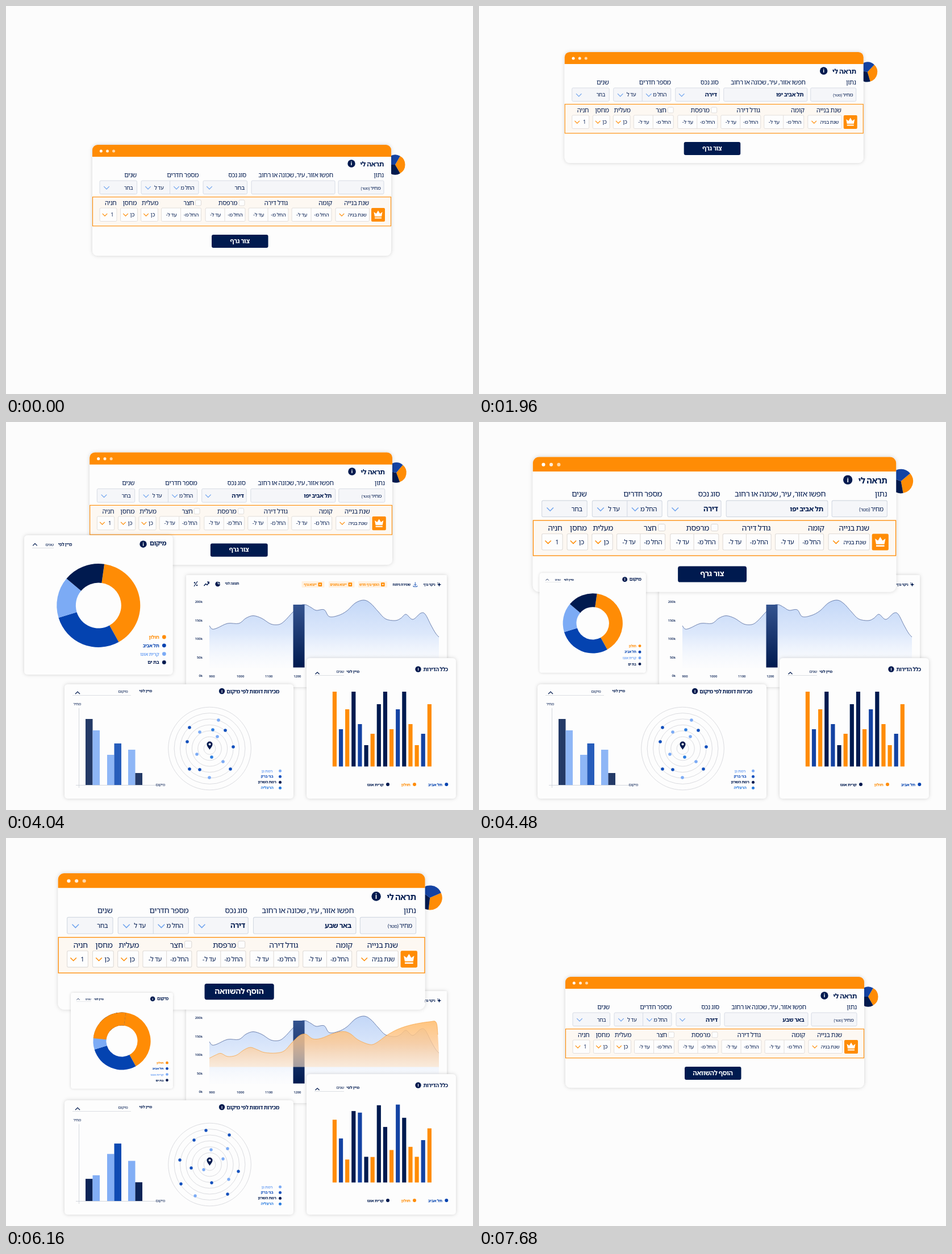
Animation, 822 px wide and 682 px high, one loop 7880 ms. Source, as an HTML page:

```html
<!DOCTYPE html>
<html lang="he">
<head>
<meta charset="utf-8">
<title>Property charts</title>
<style>
html, body { margin: 0; width: 100%; height: 100%; overflow: hidden; background: #fcfcfc; }
svg { display: block; width: 822px; height: 682px; }
text {
  font-family: "Open Sans", "Noto Sans Hebrew", "Liberation Sans", sans-serif;
  direction: rtl; white-space: pre; letter-spacing: -.025em; word-spacing: -.05em;
}
text.ltr { direction: ltr; letter-spacing: 0; }
</style>
</head>
<body>
<svg id="stage" viewBox="0 0 822 682"></svg>
<script>
const LOOP = 7880;
const NAVY = '#001a4f', BLUE = '#0443b0', MID = '#2b7de0', LIGHT = '#7cabf5', ORANGE = '#ff8c05';
const $ = id => document.getElementById(id);

// drawing helpers; Hebrew text takes its right edge as x
const text = (x, y, s, size, fill = NAVY, weight = 400, more = '') =>
  `<text x="${x}" y="${y}" font-size="${size}" fill="${fill}" font-weight="${weight}" ${more}>${s}</text>`;
const mid = 'text-anchor="middle"';
const rect = (x, y, w, h, fill, more = '') =>
  `<rect x="${x}" y="${y}" width="${w}" height="${h}" fill="${fill}" ${more}/>`;
const dot = (x, y, r, fill, more = '') => `<circle cx="${x}" cy="${y}" r="${r}" fill="${fill}" ${more}/>`;
const line = (d, stroke, w = 1, more = '') =>
  `<path d="${d}" fill="none" stroke="${stroke}" stroke-width="${w}" ${more}/>`;
const chevron = (x, y, w, stroke, dir = 1) =>
  line(`M${x - w / 2} ${y - dir * w / 4}l${w / 2} ${dir * w / 2}l${w / 2} ${-dir * w / 2}`, stroke, 1.2);
const info = (x, y, r) => dot(x, y, r, NAVY) +
  text(x, y + r * .5, 'i', r * 1.4, '#fff', 700, 'class="ltr" ' + mid);
const card = (x, y, w, h, r = 6) => rect(x, y, w, h, '#fdfdfd', `rx="${r}" filter="url(#shade)"`);
const polar = (cx, cy, r, deg) => {
  const a = (deg - 90) * Math.PI / 180;
  return `${(cx + r * Math.cos(a)).toFixed(2)} ${(cy + r * Math.sin(a)).toFixed(2)}`;
};
const wedge = (cx, cy, R, r, a, b) => {
  if (b - a < .1) return '';
  const big = b - a > 180 ? 1 : 0;
  return `M${polar(cx, cy, R, a)}A${R} ${R} 0 ${big} 1 ${polar(cx, cy, R, b)}` +
    `L${polar(cx, cy, r, b)}A${r} ${r} 0 ${big} 0 ${polar(cx, cy, r, a)}Z`;
};
const smooth = s => {
  const p = s.split(' ').map(q => q.split(',').map(Number));
  let d = 'M' + p[0];
  for (let i = 0; i < p.length - 1; i++) {
    const a = p[i - 1] || p[i], b = p[i], c = p[i + 1], e = p[i + 2] || c;
    const k = j => [b[j] + (c[j] - a[j]) / 6, c[j] - (e[j] - b[j]) / 6];
    const [x1, x2] = k(0), [y1, y2] = k(1);
    d += `C${x1} ${y1} ${x2} ${y2} ${c}`;
  }
  return d;
};

// search window
function field(x, y, w, fill, stroke, split) {
  return rect(x, y, w, 23.5, fill, `rx="2" stroke="${stroke}" stroke-width=".9"`) +
    (split ? line(`M${split} ${y}v23.5`, stroke, .9) : '');
}
function windowArt() {
  const cool = (x, w, split) => field(x, 307, w, '#f5f6f9', '#d3d9e2', split);
  const warm = (x, w, split) => field(x, 355, w, '#fdfdfd', '#e0dcd8', split);
  let s = '<g id="pie">' + [[30, ORANGE], [150, NAVY], [270, '#1443a3']].map(([a, c]) =>
    `<path d="${wedge(685, 279, 17.5, 0, a, a + 120)}" fill="${c}"/>`).join('') + '</g>';
  s += card(152, 244, 526, 195, 9) +
    `<path d="M152 265v-12a9 9 0 0 1 9-9h508a9 9 0 0 1 9 9v12z" fill="${ORANGE}"/>` +
    dot(167.3, 255, 2.5, '#fff') + dot(178.5, 255, 2.5, '#fff', 'opacity=".85"') +
    dot(189.5, 255, 2.5, '#fff', 'opacity=".65"') +
    text(665, 282, 'תראה לי', 11.9, NAVY, 700) + info(608, 277, 6.7);
  for (const [x, l] of [[665, 'נתון'], [576, 'חפשו אזור, עיר, שכונה או רחוב'], [423, 'סוג נכס'],
    [339, 'מספר חדרים'], [230, 'שנים']]) s += text(x, 301, l, 11.2);
  s += cool(585, 80) + cool(432, 147) + cool(347, 77.5) + cool(238, 101, 288.5) + cool(165, 65.5) +
    text(659.5, 322.5, 'מחיר', 9.1) + text(640, 322.5, '(מטר)', 6.8) +
    text(331.5, 322.5, 'החל מ', 9.4) + text(277.5, 322.5, 'עד ל', 9.4) + text(223.5, 322.5, 'בחר', 9.4) +
    text(572.5, 322.5, '', 10, NAVY, 700, 'id="city"') + text(420, 322.5, '', 10.6, NAVY, 400, 'id="kind"');
  for (const x of [358, 300, 250, 177]) s += chevron(x, 319.5, 9.5, '#6ea3ee');
  s += rect(152.5, 335.7, 525, 51, '#fdf8f2', `stroke="${ORANGE}" stroke-width="1.1"`);
  for (const [x, l] of [[639, 'שנת בנייה'], [574, 'קומה'], [496, 'גודל דירה'], [407, 'מרפסת'],
    [331, 'חצר'], [268, 'מעלית'], [230, 'מחסן'], [194.5, 'חניה']]) s += text(x, 350.3, l, 11.2);
  for (const x of [410, 333.5]) s += rect(x, 341, 10, 10, '#fdfdfd', 'rx="2" stroke="#d9d5d2" stroke-width=".8"');
  s += warm(580, 59.5) + text(634.5, 370, 'שנת בניה', 9) + chevron(591, 367, 8.5, ORANGE);
  for (const x of [503, 427, 351, 273.5])
    s += warm(x, 70, x + 34) + text(x + 65.5, 370, 'החל מ-', 9.2) + text(x + 27, 370, 'עד ל-', 9.2);
  for (const [x, l] of [[237.5, 'כן'], [201.5, 'כן'], [165, '1']])
    s += warm(x, 30) + text(x + 24.5, 370, l, 9.4) + chevron(x + 9, 367, 8.5, ORANGE);
  s += rect(643, 355, 24, 24, ORANGE, 'rx="2"') +
    '<path d="M649 370l-1.5-8 4.2 3 3.3-5.5 3.3 5.5 4.2-3-1.5 8zM649 371.5h12v2h-12z" fill="#fff"/>' +
    rect(362, 402, 99.5, 23, NAVY, 'rx="3"') + text(411.5, 416.7, '', 11.3, '#fff', 600, mid + ' id="action"');
  return s;
}

// area chart card
const curveA = smooth('358,358 363,364 372,362 390,354 410,354 422,345 435,340.5 450,345 466,355 480,356 490,350 505,334 517,323 527,321 537,326 546,331 560,330 569,342 585,340 600,332 615,318 630,313 642,319 655,333 668,346 685,349 695,345 704,338 716,347 730,336 738,338 748,357 756,371 762,378');
const curveB = smooth('358,387 368,382 378,378.5 390,384 405,382 418,373 430,368 442,372 455,377 475,378 490,374 503,360 517,347 528,345 540,353 555,352 575,344 593,340 606,344 620,355 640,363 652,360 670,347 690,336 715,328 745,323 757,324 760,345 762,378');
function areaArt() {
  const chip = (x, w, l) => rect(x, 280, w, 11, '#fff1e0', 'rx="1"') +
    text(x + w - 14, 287.8, l, 5.8, ORANGE, 700) +
    rect(x + w - 11, 282.3, 6.6, 6.6, ORANGE, 'rx="1"') + rect(x + w - 9, 284.6, 2.6, 2, '#fff1e0');
  let s = card(317, 269, 459, 197, 3) +
    line('M331 289l6-9', NAVY, 1.2) + dot(332, 282.5, 1.2, NAVY) + dot(336, 287, 1.2, NAVY) +
    line('M348.5 288l3-3.5 2.5 2 3-4.5M354 281.2h3.2v3.2', NAVY, 1.4) +
    dot(372.7, 284.8, 4.4, NAVY) + line('M373.2 280v4.5h4.5', '#fdfdfd', 1) +
    text(410, 285.5, 'תצוגה לפי', 5.8, NAVY, 600) +
    chip(520.5, 40, 'ייצוא גרף') + chip(568, 45.5, 'ייצוא נתונים') + chip(620, 51, 'הוסף גרף חדש') +
    text(712, 288, 'שמירת ניתוח', 5.8, NAVY, 600) +
    line('M720.3 281.5v6m-2.2-2.2l2.2 2.2 2.2-2.2M717 287.5v2h6.6v-2', BLUE, .9) +
    text(755.5, 288, 'ניקוי גרף', 5.8, NAVY, 600) +
    `<path d="M762.5 282l1 2.8 2.8 1-2.8 1-1 2.8-1-2.8-2.8-1 2.8-1z" fill="${NAVY}"/>` + dot(760, 283, .8, NAVY);
  [200, 150, 100, 50, 0].forEach((v, i) =>
    s += text(346, 318 + i * 32.5, v + 'k', 5.8, NAVY, 600, 'class="ltr" text-anchor="end"'));
  for (let i = 0; i < 9; i++)
    s += text(362.5 + i * 50.1, 449.4, 900 + i * 100, 5.8, NAVY, 600, 'class="ltr" ' + mid);
  const layer = (n, d, ink) => `<path d="${d}V432H358Z" fill="url(#fill${n})" clip-path="url(#clip${n})"/>` +
    line(d, ink, .8, `id="line${n}" pathLength="100" stroke-dasharray="100 200"`);
  return s + layer('A', curveA, '#51689c') + rect(505.5, 321, 20, 0, 'url(#columnFill)', 'id="column"') +
    layer('B', curveB, '#f6a649');
}

// ring chart card
const slices = [[8, 151, ORANGE], [151, 253, BLUE], [253, 310, LIGHT], [310, 368, NAVY]];
function ringArt() {
  let s = card(32, 199, 261.5, 245) + text(282, 217.5, 'מיקום', 11.2, NAVY, 700) + info(241.5, 214.7, 6.2) +
    text(116, 218.5, 'מיין לפי', 7.5, NAVY, 600) + text(84, 218.5, 'שנים', 7.5) +
    line('M46 221.5h38', '#d5d8de', .8) + chevron(51, 215.5, 7.5, NAVY, -1);
  slices.forEach((a, i) => s += `<path id="slice${i}" fill="${a[2]}"/>`);
  s += `<path id="cover" fill="${ORANGE}"/>`;
  ['חולון', 'תל אביב', 'קרית אונו', 'בת ים'].forEach((l, i) => {
    const c = slices[i][2], y = 378 + i * 14.8;
    s += dot(278.3, y, 3.4, c) + text(269.5, y + 3, l, 8.4, c, 600);
  });
  return s;
}

// similar sales card
const pairs = [[140, 522, 613, NAVY], [152.5, 542, 602, LIGHT], [178, 585, 550, LIGHT],
  [190.5, 565, 532, BLUE], [215, 576, 566, LIGHT], [227.5, 617, 603, NAVY]];
const before = '323,537 386,542 319,562 400,571 323,610 395,610 341,611 364,541 362,589 374,524 341,545 372,553 336,584 382,597 358,625';
const after = '352,514 393,522 331,531 306,566 326,580 409,586 308,608 362,606 390,626 361,548 390,546 382,564 348,583 392,600 333,629';
const spots = (s, name) => s.split(' ').map((p, i) =>
  dot(...p.split(','), 0, i > 8 ? LIGHT : name === 'old' && i > 6 ? MID : '#1250bd', `class="${name}"`)).join('');
function salesArt() {
  let s = card(103, 461, 403, 201) + text(481, 476.5, 'מכירות דומות לפי מיקום', 9.2, NAVY, 700) +
    info(380, 473, 5.2) + text(257, 474.5, 'מיין לפי', 7, NAVY, 600) + text(214.5, 475.5, 'מיקום', 7) +
    line('M117 480.5h103', '#d5d8de', .8) + chevron(126, 476, 8, NAVY, -1) +
    text(132, 498, 'מחיר', 6.8) + text(280, 639.5, 'מיקום', 6.8) +
    line('M128.5 503v140M123 638.5h141', '#cfd3da', .9);
  pairs.forEach((b, i) => s += rect(b[0], 638, 12.5, 0, b[3], `id="pair${i}"`));
  for (let i = 1; i < 8; i++) s += dot(358.5, 574, i * 10.4, 'none', 'stroke="#d2d4d9" stroke-width=".8"');
  s += spots(before, 'old') + spots(after, 'new') +
    `<path d="M358.5 576c-2-3.5-5-6-5-9.5a5 5 0 0 1 10 0c0 3.5-3 6-5 9.5z" fill="${NAVY}"/>` + dot(358.5, 566.5, 2, '#fff');
  [['רמת גן', LIGHT], ['בני ברק', '#1250bd'], ['רמת השרון', NAVY], ['הרצליה', MID]].forEach(([l, c], i) =>
    s += dot(482.5, 613.3 + i * 10, 2.5, c) + text(459.5, 615.5 + i * 9.9, l, 7, c, 600, mid));
  return s;
}

// all apartments card
const topsOld = [474, 540, 505, 474, 531, 568, 548, 496];
const topsNew = [499, 526, 576, 481, 474, 559, 563, 465, 514, 550, 462, 495, 545, 559, 528, 513];
function flatsArt() {
  const ink = { o: ORANGE, b: '#1443a3', d: NAVY };
  let s = card(529, 415, 263, 247) + text(778, 438, 'כלל הדירות', 9.2, NAVY, 700) + info(725.5, 434.5, 5.2) +
    text(622, 441, 'מיין לפי', 7, NAVY, 600) + text(595, 441, 'שנים', 7) +
    line('M543 445.5h52', '#d5d8de', .8) + chevron(548, 441.5, 7, NAVY, -1);
  [...'obodbdoddobdoobo'].forEach((c, i) => s += rect(574.8 + i * 11.13, 605.5, 7.2, 0, ink[c], `id="flat${i}"`));
  for (const [x, l, c] of [[775.3, 'תל אביב', BLUE], [719, 'חולון', ORANGE], [672, 'קרית אונו', NAVY]])
    s += dot(x, 637, 3, c) + text(x - 7.5, 639.5, l, 7.3, c, 600);
  return s;
}

const fade = (id, stops, y1, y2) =>
  `<linearGradient id="${id}" gradientUnits="userSpaceOnUse" x1="0" x2="0" y1="${y1}" y2="${y2}">` +
  stops.map(([o, c, a]) => `<stop offset="${o}" stop-color="${c}" stop-opacity="${a}"/>`).join('') + '</linearGradient>';
$('stage').innerHTML = '<defs>' +
  '<filter id="shade" x="-10%" y="-10%" width="120%" height="120%"><feDropShadow dx="0" dy="0" stdDeviation="3" flood-color="#000" flood-opacity=".17"/></filter>' +
  fade('fillA', [[0, '#c3d7f7', 1], [.5, '#dbe7fb', .95], [1, '#f8fafe', .3]], 313, 432) +
  fade('fillB', [[0, '#ffbe70', .88], [.35, '#fdc994', .8], [1, '#fff6ec', .5]], 323, 432) +
  fade('columnFill', [[0, '#34538f', 1], [1, NAVY, 1]], 321, 432) +
  ['A', 'B'].map(n => `<clipPath id="clip${n}"><rect id="wipe${n}" x="350" y="300" width="420" height="0"/></clipPath>`).join('') +
  '</defs>' + [['area', areaArt], ['window', windowArt], ['flats', flatsArt], ['sales', salesArt], ['ring', ringArt]]
    .map(([id, art]) => `<g id="${id}">${art()}</g>`).join('');

// timing helpers
const part = (t, a, b) => Math.min(1, Math.max(0, (t - a) / (b - a)));
const lerp = (a, b, p) => a + (b - a) * p;
const cubic = p => p < .5 ? 4 * p ** 3 : 1 - (2 - 2 * p) ** 3 / 2;
const quad = p => p < .5 ? 2 * p * p : 1 - (2 - 2 * p) ** 2 / 2;
const out = p => 1 - (1 - p) ** 3;
const back = p => 1 + 1.6 * (p - 1) ** 3 + .6 * (p - 1) ** 2;
const set = (id, k, v) => $(id).setAttribute(k, v);

const swing = [[0, 0], [760, 47], [1520, 0], [2680, 47], [4040, 10], [5240, 46], [6920, 30], [7680, 0], [LOOP, 0]];
function along(keys, t) {
  const i = keys.findIndex(k => k[0] > t), [a, x] = keys[i - 1], [b, y] = keys[i];
  return lerp(x, y, quad(part(t, a, b)));
}
function pop(id, t, a, b, cx, cy, base = '') {
  const p = part(t, a, b), q = part(t, 7250, 7480);
  const k = p ? lerp(.3, 1, back(p)) * (1 - .7 * q * q) : 0;
  set(id, 'transform', `${base} translate(${cx} ${cy}) scale(${k}) translate(${-cx} ${-cy})`);
  set(id, 'opacity', Math.min(1, p * 3) * (1 - q));
}
function bar(id, base, top) {
  set(id, 'y', top);
  set(id, 'height', base - top);
}
function cityAt(t) {
  const first = 'תל אביב יפו', next = 'באר שבע';
  if (t < 4700) return first.slice(0, Math.round(first.length * (part(t, 200, 760) - part(t, 4480, 4640))));
  return next.slice(0, Math.round(next.length * part(t, 4700, 5100)));
}

function draw(t) {
  const up = cubic(part(t, 1440, 2220)), grow = quad(part(t, 3930, 4590)), home = quad(part(t, 7250, 7640));
  const cx = lerp(lerp(lerp(415, 413.5, up), 414.6, grow), 415, home);
  const top = lerp(lerp(lerp(244, 53, up), 62, grow), 244, home);
  set('window', 'transform', `translate(${cx} ${top}) scale(${1 + .228 * grow * (1 - home)}) translate(-415 -244)`);
  set('pie', 'transform', `rotate(${along(swing, t)} 685 279)`);
  $('city').textContent = cityAt(t);
  $('kind').textContent = t < 1000 ? 'בחר' : 'דירה';
  set('kind', 'font-weight', t < 1000 ? 400 : 700);
  $('action').textContent = t < 5440 ? 'צור גרף' : 'הוסף להשוואה';

  pop('area', t, 2120, 2400, 546.5, 367.5);
  set('lineA', 'stroke-dashoffset', 100 - 100 * part(t, 2320, 2695));
  set('wipeA', 'height', lerp(13, 133, part(t, 2400, 2860)));
  bar('column', 431.5, lerp(431.5, 321, out(part(t, 2950, 3350))));
  const second = part(t, 5600, 6200);
  set('lineB', 'stroke-dashoffset', 100 - 100 * second);
  set('lineB', 'opacity', second ? 1 : 0);
  set('wipeB', 'height', second ? lerp(20, 133, part(t, 5650, 6350)) : 0);

  const small = quad(part(t, 4040, 4600)), k = lerp(1, .688, small);
  const base = `translate(${lerp(32, 114, small)} ${lerp(199, 272, small)}) scale(${k}) translate(-32 -199)`;
  pop('ring', t, 2410, 2750, 162.8, 321.5, base);
  const sweep = 8 + 360 * part(t, 2610, 3210);
  slices.forEach(([a, b], i) => set('slice' + i, 'd', wedge(162.8, 322.5, 73.5, 40, a, Math.min(b, sweep))));
  set('cover', 'd', wedge(162.8, 322.5, 73.5, 40, lerp(368, 253, quad(part(t, 5640, 6400))), 368));

  pop('sales', t, 2720, 3050, 304.5, 561.5);
  const change = quad(part(t, 5640, 6360));
  pairs.forEach((b, i) => {
    const p = out(part(t, 3000 + i * 40, 3400 + i * 40));
    bar('pair' + i, 638, lerp(638, lerp(b[1], b[2], change), p));
    set('pair' + i, 'opacity', lerp(.86, .97, change));
  });
  const oldR = 2.8 * out(part(t, 3050, 3450)) * (1 - part(t, 5640, 5900)), newR = 2.8 * out(part(t, 5900, 6300));
  document.querySelectorAll('.old').forEach(e => e.setAttribute('r', oldR));
  document.querySelectorAll('.new').forEach(e => e.setAttribute('r', newR));

  pop('flats', t, 2790, 3120, 660.5, 538.5);
  topsNew.forEach((y, i) => {
    const p = out(part(t, 3060 + i * 20, 3400 + i * 20));
    bar('flat' + i, 605.5, lerp(605.5, lerp(topsOld[i % 8], y, change), p));
  });
}

function tick() {
  draw(performance.now() % LOOP);
  requestAnimationFrame(tick);
}
tick();
</script>
</body>
</html>
```
